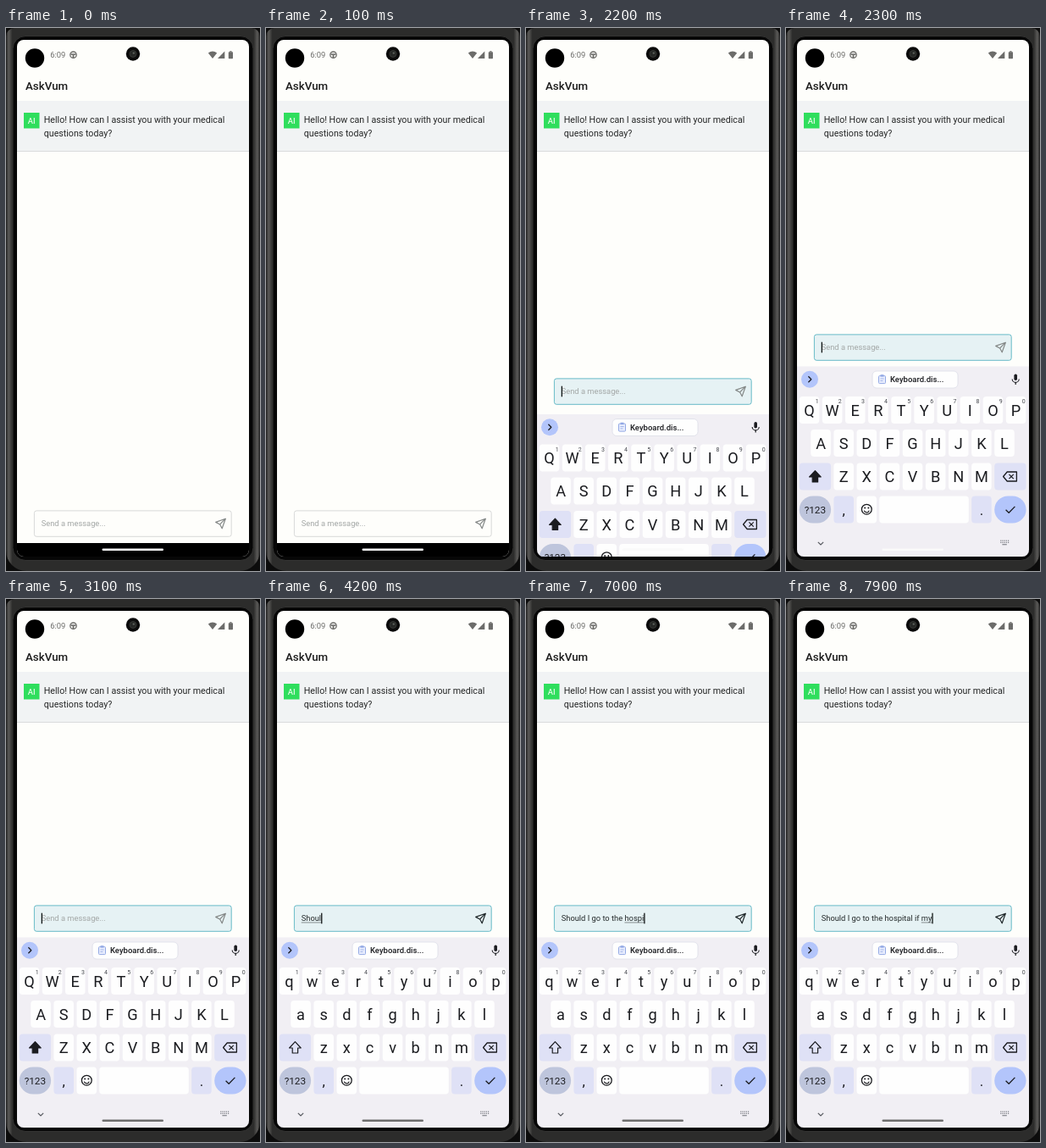
An HTML page with a canvas that plays this animation: 300x641 px, repeating every 8000 ms.

```html
<!DOCTYPE html>
<html lang="en">
<head>
<meta charset="utf-8">
<title>Chat on a phone</title>
<style>
  html, body { margin: 0; width: 100%; height: 100%; overflow: hidden; background: #000; }
  canvas { display: block; width: 300px; height: 641px; }
</style>
</head>
<body>
<canvas id="stage"></canvas>
<script>
const W = 300, H = 641, LOOP = 8000, STEP = 100;
const canvas = document.getElementById("stage");
const ctx = canvas.getContext("2d");
const dpr = window.devicePixelRatio || 1;
canvas.width = W * dpr;
canvas.height = H * dpr;

const FOCUS = 2100, KEYBOARD_UP = 2300, LOWERCASE = 3400;
const MESSAGE = "Should I go to the hospital if my";
// Time of each keystroke, in steps of 100 ms.
const STROKES = [33, 36, 39, 42, 42, 43, 45, 47, 48, 50, 52, 53, 54, 56, 57, 58, 59,
  60, 61, 62, 64, 66, 68, 70, 71, 72, 72, 73, 75, 75, 77, 78, 79];

const clamp = v => Math.min(1, Math.max(0, v));

function box(x, y, w, h, r, fill, stroke, line = 1) {
  ctx.beginPath();
  ctx.roundRect(x, y, w, h, r);
  paint(fill, stroke, line);
}

function disc(x, y, r, fill, stroke, line = 1) {
  ctx.beginPath();
  ctx.arc(x, y, r, 0, Math.PI * 2);
  paint(fill, stroke, line);
}

function shape(points, fill, stroke, line = 1, closed = true) {
  ctx.beginPath();
  points.forEach(([x, y]) => ctx.lineTo(x, y));
  if (closed) ctx.closePath();
  paint(fill, stroke, line);
}

function paint(fill, stroke, line) {
  if (fill) { ctx.fillStyle = fill; ctx.fill(); }
  if (stroke) { ctx.strokeStyle = stroke; ctx.lineWidth = line; ctx.stroke(); }
}

function setFont(size, weight = 400) {
  ctx.font = `${weight} ${size}px Roboto, sans-serif`;
}

function label(text, x, y, size, color, weight = 400, align = "left") {
  setFont(size, weight);
  ctx.textAlign = align;
  ctx.fillStyle = color;
  ctx.fillText(text, x, y);
}

function drawBody() {
  ctx.fillStyle = "#0c0c0c";
  ctx.fillRect(0, 0, W, H);
  const side = ctx.createLinearGradient(0, 0, W, 0);
  side.addColorStop(0, "#1e1e1e");
  side.addColorStop(0.01, "#5c5b59");
  side.addColorStop(0.025, "#2c2c2b");
  side.addColorStop(0.975, "#2c2c2b");
  side.addColorStop(0.99, "#5c5b59");
  side.addColorStop(1, "#1e1e1e");
  box(0, 0, W, H, [10, 10, 24, 24], side);
  box(8, 9.5, 284, 619, 15, "#070707", "#343433", 1);
}

function drawStatusBar() {
  const gray = "#6c6c6a";
  disc(34, 35.5, 11.2, "#000");
  label("6:09", 52.3, 35.3, 9.33, gray);
  disc(79.5, 31.7, 3.7, null, gray, 1.3);
  ctx.fillStyle = gray;
  ctx.fillRect(76.5, 30.3, 6, 1.6);
  ctx.fillRect(78.6, 32, 1.8, 3);
  disc(150, 30.5, 8.2, "#0b0b0b");
  disc(150, 30.5, 4, "#252725", "#3a3c39", 0.8);
  disc(150.8, 29.6, 1.2, "#5c615c");
  ctx.beginPath();
  ctx.moveTo(244, 36);
  ctx.lineTo(238.8, 29.4);
  ctx.quadraticCurveTo(244, 25.4, 249.2, 29.4);
  ctx.closePath();
  paint(gray);
  shape([[250, 36], [258.3, 36], [258.3, 27.5]], gray);
  box(262.8, 28.2, 5.2, 8, 0.7, gray);
  ctx.fillRect(264.2, 27.2, 2.4, 1.2);
}

function drawChat() {
  label("AskVum", 23, 73, 13.33, "#1c1c1c", 500);
  ctx.fillStyle = "#f1f3f4";
  ctx.fillRect(13, 86, 274, 59.5);
  ctx.fillStyle = "#d9dbdc";
  ctx.fillRect(13, 145, 274, 1);
  ctx.fillStyle = "#2fde5d";
  ctx.fillRect(21, 100, 18.5, 18.5);
  label("AI", 30.2, 112.6, 9.33, "#e6fbea", 500, "center");
  label("Hello! How can I assist you with your medical", 44.7, 111.8, 10.67, "#262727");
  label("questions today?", 44.7, 127.9, 10.67, "#262727");
}

function drawInput(t, lift) {
  const focused = t >= FOCUS;
  const typed = MESSAGE.slice(0, STROKES.filter(s => s * STEP <= t).length);
  ctx.save();
  ctx.translate(0, -208 * lift);
  box(33.4, 569.9, 232.8, 30.4, 2.7, focused ? "#e6f2f4" : null, focused ? "#66bac7" : "#d8d9d8");
  if (typed) {
    label(typed, 41.7, 588.4, 9.33, "#252b2c");
    const words = typed.trimEnd();
    const start = words.lastIndexOf(" ") + 1;
    const left = 41.7 + ctx.measureText(words.slice(0, start)).width;
    ctx.fillStyle = "#5a6061";
    ctx.fillRect(left, 589.6, ctx.measureText(words.slice(start)).width, 0.7);
  } else {
    label("Send a message...", 41.7, 588.4, 9.33, "#a3a7a6");
  }
  const blinkOff = t >= 2600 && t < 3100;
  if (focused && !blinkOff) {
    setFont(9.33);
    ctx.fillStyle = "#101414";
    ctx.fillRect(41.7 + ctx.measureText(typed).width, 578.7, 1.3, 12.6);
  }
  const ink = typed ? "#20282a" : "#858988";
  shape([[259.3, 579.2], [247.7, 583.4], [252.6, 586], [255.2, 590.8]], null, ink, 1.2);
  shape([[252.6, 586], [259.3, 579.2]], null, ink, 1.1, false);
  ctx.restore();
}

const PITCH = 27.12, FIRST = 27.5, KEY_H = 32;

function key(center, y, fill = "#fefefe", w = 23.6, r = 4) {
  box(center - w / 2, y, w, KEY_H, r, fill);
}

function drawLetters(letters, firstCenter, y, upper) {
  [...letters].forEach((c, i) => {
    const x = firstCenter + i * PITCH;
    key(x, y);
    label(upper ? c.toUpperCase() : c, x, y + 22.8, 18.2, "#1b1c20", 400, "center");
  });
}

function drawKeyboard(upper) {
  const ink = "#1b1c20", pale = "#dfe1f6", blue = "#b3c5fb";
  ctx.fillStyle = "#f1eff4";
  ctx.fillRect(13, 399.5, 274, 226);

  // Suggestion strip
  disc(28, 414.7, 10, blue);
  shape([[26.4, 411.2], [29.8, 414.7], [26.4, 418.2]], null, ink, 1.3, false);
  box(102, 405, 101, 20, 5, "#fefefe", "#dcdee8", 0.8);
  box(109.5, 410.6, 8, 9, 1, "#e8edfd", "#92a8e4", 1);
  ctx.fillStyle = "#92a8e4";
  ctx.fillRect(111.6, 409.2, 3.8, 2.4);
  ctx.fillRect(111.4, 413.6, 4.2, 0.8);
  ctx.fillRect(111.4, 416, 3, 0.8);
  label("Keyboard.dis...", 123, 418.3, 9.5, ink, 500);
  box(269.4, 408.4, 3.6, 7.6, 1.8, ink);
  ctx.beginPath();
  ctx.arc(271.2, 414.4, 4, 0, Math.PI);
  paint(null, ink, 1.1);
  ctx.fillStyle = ink;
  ctx.fillRect(270.6, 418.2, 1.2, 2.8);

  drawLetters("qwertyuiop", FIRST, 435, upper);
  [..."1234567890"].forEach((d, i) =>
    label(d, FIRST + i * PITCH + 9.2, 443.4, 7, "#44464d", 400, "center"));
  drawLetters("asdfghjkl", FIRST + PITCH / 2, 474, upper);
  drawLetters("zxcvbnm", FIRST + 1.5 * PITCH, 513.5, upper);

  // Shift and backspace
  key(34.4, 513.5, pale, 37.4);
  shape([[34.4, 522.6], [41.2, 530], [37.6, 530], [37.6, 536], [31.2, 536], [31.2, 530], [27.6, 530]],
    upper ? ink : null, ink, 1.2);
  key(264.9, 513.5, pale, 37.4);
  shape([[256.6, 529.5], [261.2, 524], [272.4, 524], [272.4, 535], [261.2, 535]], null, ink, 1.3);
  shape([[263.4, 526.8], [268.8, 532.2]], null, ink, 1.2, false);
  shape([[268.8, 526.8], [263.4, 532.2]], null, ink, 1.2, false);

  // Bottom row
  key(34.4, 552.5, "#bec5dc", 37.4, 16);
  label("?123", 34.4, 572.8, 11.8, ink, 400, "center");
  key(68.2, 552.5, pale);
  label(",", 68.2, 575, 17, ink, 400, "center");
  key(95.3, 552.5);
  disc(95.3, 568.2, 5.9, null, ink, 1.3);
  disc(93.2, 566.4, 1, ink);
  disc(97.4, 566.4, 1, ink);
  ctx.beginPath();
  ctx.arc(95.3, 568.8, 3, 0.25, Math.PI - 0.25);
  paint(null, ink, 1.2);
  key(163, 552.5, "#fefefe", 105.6);
  key(230.9, 552.5, pale);
  label(".", 230.9, 575, 17, ink, 400, "center");
  key(264.9, 552.5, blue, 37.4, 16);
  shape([[259.6, 568.8], [263.2, 572.3], [270.4, 564.9]], null, ink, 1.3, false);

  shape([[37.8, 606.8], [41, 610], [44.2, 606.8]], null, "#55575d", 1.1, false);
  ctx.fillStyle = "#777980";
  for (let row = 0; row < 2; row++)
    for (let col = 0; col < 5; col++) ctx.fillRect(253.2 + col * 2.2, 604.6 + row * 2.2, 1.2, 1.2);
  ctx.fillRect(255.4, 609.2, 5.4, 1.1);
}

function drawScreen(t) {
  const lift = 1 - (1 - clamp((t - FOCUS) / (KEYBOARD_UP - FOCUS))) ** 2;
  ctx.save();
  ctx.beginPath();
  ctx.roundRect(13, 14, 274, 610, 8);
  ctx.clip();
  ctx.fillStyle = "#fefefb";
  ctx.fillRect(13, 14, 274, 611);
  drawStatusBar();
  drawChat();
  drawInput(t, lift);
  ctx.fillStyle = "#000";
  ctx.fillRect(13, 608, 274, 17);
  if (lift > 0) {
    ctx.save();
    ctx.translate(0, 226 * (1 - lift));
    drawKeyboard(t < LOWERCASE);
    ctx.restore();
  }
  const shade = Math.round(250 - 140 * clamp((t - 2300) / 600));
  box(113.5, 614.5, 72.5, 2.6, 1.3, `rgb(${shade},${shade},${shade})`);
  ctx.restore();
}

function frame() {
  const t = Math.floor((performance.now() % LOOP) / STEP) * STEP;
  ctx.setTransform(dpr, 0, 0, dpr, 0, 0);
  ctx.lineJoin = "round";
  drawBody();
  drawScreen(t);
  requestAnimationFrame(frame);
}
frame();
</script>
</body>
</html>
```
